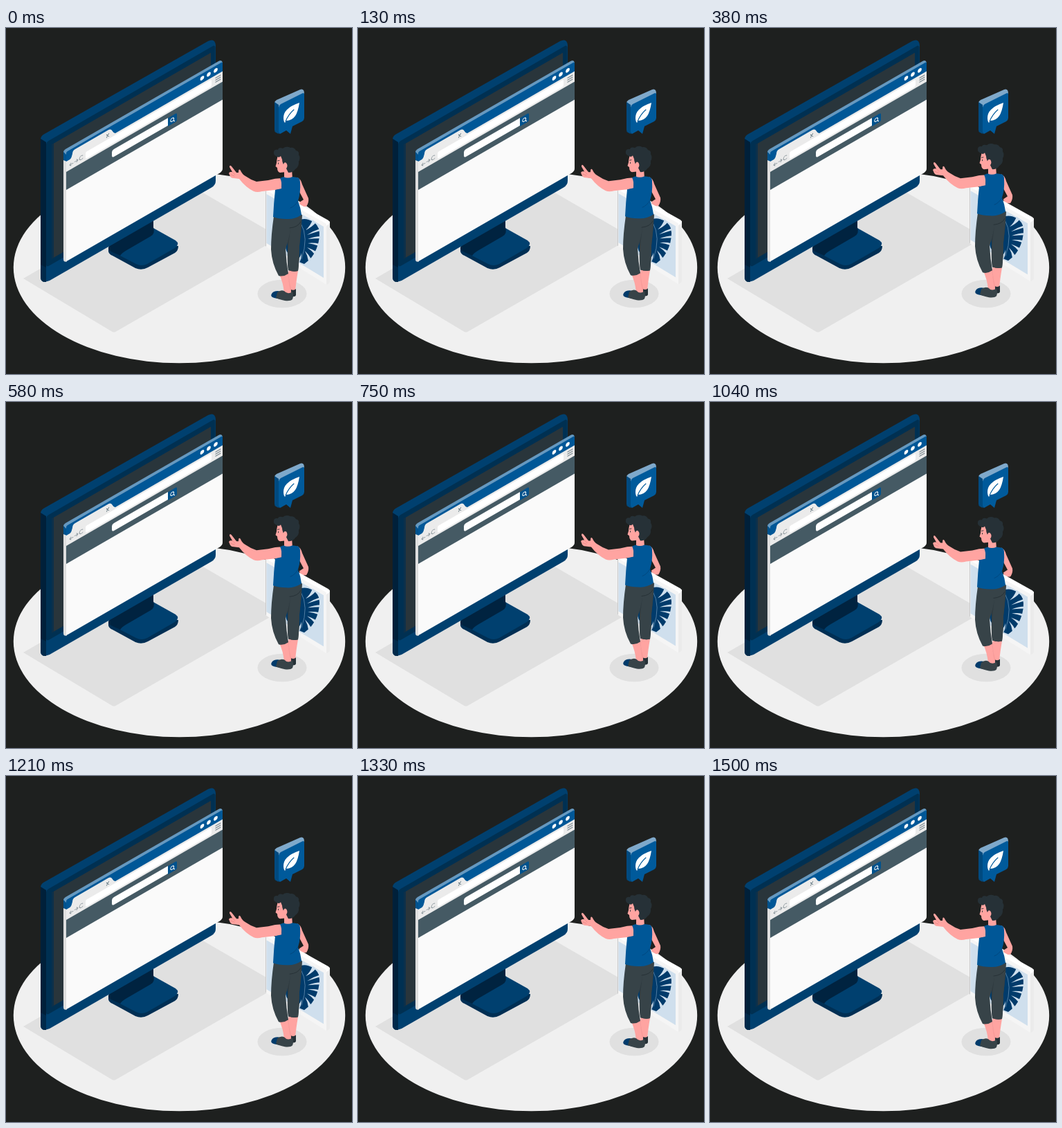
Recreate the animation shown at these times as an HTML page with a canvas. Size 500 by 500 pixels, loop 1540 ms.

```html
<!DOCTYPE html>
<html lang="en">
<head>
<meta charset="utf-8">
<title>Isometric browser scene</title>
<style>
html, body { margin: 0; width: 100%; height: 100%; overflow: hidden; background: #1e201f; }
canvas { display: block; width: 500px; height: 500px; }
</style>
</head>
<body>
<canvas id="stage" width="500" height="500"></canvas>
<script>
const ctx = document.getElementById('stage').getContext('2d');
const LOOP = 1540, STEPS = 37, LIFT = 8.5, SLOPE = -0.577;
const NAVY = '#00406f', BLUE = '#005797', SKIN = '#ffa4a1', PANTS = '#374348', HAIR = '#263137';
const GLASS = '#cfdfed', LEAF = '#003b6b';

function fill(color, path) {
  ctx.fillStyle = color;
  ctx.fill(new Path2D(path));
}

function line(color, width, path) {
  ctx.strokeStyle = color;
  ctx.lineWidth = width;
  ctx.lineCap = ctx.lineJoin = 'round';
  ctx.stroke(new Path2D(path));
}

function oval(color, x, y, rx, ry = rx) {
  ctx.fillStyle = color;
  ctx.beginPath();
  ctx.ellipse(x, y, rx, ry, 0, 0, Math.PI * 2);
  ctx.fill();
}

function box(color, x, y, w, h, radius = 0) {
  ctx.fillStyle = color;
  ctx.beginPath();
  ctx.roundRect(x, y, w, h, radius);
  ctx.fill();
}

// Draws in a plane whose horizontal axis climbs to the right.
function slanted(x, y, draw) {
  ctx.save();
  ctx.transform(1, SLOPE, 0, 1, x, y);
  draw();
  ctx.restore();
}

function drawFloor() {
  box('#1e201f', 0, 0, 500, 500);
  oval('#f0f0f0', 250.5, 346, 239.7, 138.3);
  fill('#e0e0e0', 'M25 362L262 225L396 302.5L160 438Q156 441 152 438Z');
}

function drawMonitor() {
  fill('#002f54', 'M148 317V323Q149 327 154 329L187 347Q196 351 205 346L244 325Q249 322 249 315Z');
  fill(NAVY, 'M152 320L211 288L245 307Q252 312 244 318L204 341Q196 345 188 341L161 327Z');
  fill('#002340', 'M148 317Q149 314 154 312L178 298L213 277V288Q216 297 209 301L178 319Q167 325 165 329L152 323Q148 321 148 317Z');

  fill(NAVY, 'M50 161Q50 157 54 154L292 19Q302 14 303 25V221Q303 227 297 230.5L63 365Q50 370 50 360Z');
  fill('#002a4b', 'M50 340L58 345V367Q50 368 50 360Z');
  fill('#00203a', 'M50 160L58 165V346L50 342Z');
  slanted(58, 165, () => {
    box('#003052', 0, 0, 244.5, 181, 4);
    box('#29353b', 8, 8, 230, 165);
    box('#0c304b', 8, 8, 3, 165);
  });
}

function drawBrowser() {
  fill('#dedede', 'M83 181L88 183V337.5Q83 339 83 334Z');
  fill('#00528d', 'M83 178L88 180V193L83 191Z');
  fill('#6699c0', 'M83 179Q83 177 86 175L308 47.5Q312 46 313 50V53L87 183Z');
  slanted(87, 182, () => {
    box('#fafafa', 0, 0, 226, 155.5, [0, 2, 4, 2]);
    box(BLUE, 0, -2.8, 226, 15, [2, 2, 0, 0]);
    box('#ebebeb', 0, 11, 226, 15);
    fill('#ebebeb', 'M5 12Q8 10 9 5Q9 0.5 13 0.5H61Q65 0.5 67 6Q69 11 73 12Z');
    box('#ffffff', 28, 13.5, 182, 10, 2);
    box('#455a64', 0, 26, 226, 26);
    box('#ffffff', 66, 32.7, 81, 11, [3, 0, 0, 3]);
    box('#00528d', 147, 33, 13, 12, [0, 2, 2, 0]);
    for (const u of [196.5, 206, 216]) oval('#ffffff', u, 3.8, 2.9);
    for (const v of [14.8, 17.8, 20.8]) line('#77858c', 1.2, `M216 ${v}h7`);
    line('#8b969c', 0.9, 'M5 19h5M7 17L5 19L7 21M12 18.5h5M15 16.5L17 18.5L15 20.5M24 16A2.8 2.8 0 1 0 24 20');
    line('#546b76', 0.9, 'M58.3 6l3.4 4M61.7 6l-3.4 4');
    line('#ffffff', 1, 'M155.6 39a2.4 2.4 0 1 0-4.8 0a2.4 2.4 0 1 0 4.8 0M155 41l1.6 2');
  });
}

function drawBubble() {
  fill('#7fa9cb', 'M388 108Q388 106 391 104L425 89Q431 87 431 95L394 115Z');
  fill('#004a80', 'M388 107L394 111V153L390 151Q388 150 388 147Z');
  fill('#005a9b', 'M394 115Q394 112 397 110L428 94.5Q431 93 431 96V130Q431 133 428 135L414 142L411 153L405 148L397 152.5Q394 154 394 150Z');
  fill('#ffffff', 'M424 108Q412 112 406 118Q401 123 401 130Q401 135 403 137L405 134Q413 134 418 127Q422 121 424 108Z');
  line('#005a9b', 1.1, 'M404 135Q408 125 416 118');
}

function drawLeaf() {
  fill(LEAF, 'M420 281Q427 274 437 277Q448 280 452 290Q455 302 449 318Q444 332 431 341Q419 337 408 326Q402 320 405 308Z');
  fill(GLASS, 'M433 292Q440 286 443 277L448 281Q442 288 433 292Z');
  fill(GLASS, 'M435 299Q444 293 454 290V293Q444 296 435 299Z');
  fill(GLASS, 'M436 305Q446 301 455 301V304Q446 304 436 305Z');
  fill(GLASS, 'M436 311Q445 310 453 312L452 315Q444 312 436 311Z');
  fill(GLASS, 'M435 317Q443 320 448 323L446 327Q441 321 435 317Z');
  fill(GLASS, 'M432 322Q438 328 441 334L437 337Q436 329 432 322Z');
  fill(GLASS, 'M427 325Q427 333 424 339L420 336Q426 331 427 325Z');
  line('#7498b9', 0.7, 'M426 282Q438 303 427 334');
}

function drawPicture() {
  fill('#ebebeb', 'M463 284L468 279V366Q468 369 463 371Z');
  fill('#ffffff', 'M375 235L380 230L466 278Q468 280 468 282L463 286Z');
  fill('#f5f5f5', 'M375 234L463 283V371L377 317Q375 316 375 314Z');
  fill('#c9c9c9', 'M375 235L376 236V316L375 315Z');
  fill(GLASS, 'M376.5 240L459 287V361L376.5 311Z');
  drawLeaf();
}

function drawLegs() {
  fill(SKIN, 'M394 354L408 352Q408 368 413 382L406 388L402 384Q401 368 394 354Z');
  fill(SKIN, 'M409 349L422 351Q419 368 418 381L412 383Q409 370 408 355Z');
  line('#f28f8f', 0.7, 'M408 355Q409 370 412 380');
  fill(LEAF, 'M384 384Q386 380 393 380L402 382L401 392Q389 391 385 389Q382 387 384 384Z');
  fill(HAIR, 'M412 378Q416 380 419 377V386Q418 389 412 388Z');
  fill(PANTS, 'M392 382Q397 378 402 380Q407 386 414 381Q416 387 414 392Q411 395 403 394Q394 392 390 390Z');

  fill('#303b40', 'M402 276L428 270Q427 293 424 315Q424 335 422 351Q416 353 408 350Q406 335 407 315Z');
  fill(PANTS, 'M387 272L427 269Q428 278 425 285Q418 290 411 291Q408 308 404 319Q405 338 408 355Q401 360 394 358Q384 340 383 320Q383 299 387 272Z');
  fill(PANTS, 'M411 290Q421 288 427 278Q426 300 424 315Q424 335 422 351Q415 353 408 350Q406 337 408 316Z');
  line('#273237', 1, 'M426 280Q422 288 410 289');
}

function drawTorso() {
  fill(SKIN, 'M402 203L413 204L414 218Q407 222 402 217Z');
  fill(SKIN, 'M399 217Q389 217 379 220L362 222Q353 219 346 214Q341 211 339 206Q336 202 336 209L333 209L326 200Q323 197 323 201L327 208L324 208Q321 209 323 212Q324 217 329 217L337 218Q346 230 358 236Q363 238 370 236L398 233Z');
  line('#e98583', 0.8, 'M327 208L331 212M325 212L330 214');
  fill(BLUE, 'M401 215Q407 218 414 215L421 216Q425 217 425 223Q426 238 422 250Q426 260 427 270Q417 277 405 276Q394 276 386 273Q387 252 389 234L398 232Q399 222 396 217Z');
  line('#00457a', 0.8, 'M422 250Q417 258 411 260');
}

function drawHead() {
  fill(SKIN, 'M393 184Q391 191 391 195L389.5 200Q391 201 392 202Q392 208 396 209L405 208L412 201V184Z');
  fill(HAIR, 'M392 186Q386 184 387 179Q388 175 393 176Q394 172 400 174Q405 170 411 173Q416 172 419 177Q424 178 423 183Q426 188 423 193Q424 200 418 204Q415 209 408 209L405 203Q399 196 399 190L397 185Q395 188 392 186Z');
  fill(SKIN, 'M401 197Q402 193 405 195Q408 199 405 203Q401 205 400 201Z');
  line(HAIR, 0.9, 'M392.5 192L395 191.5M393.5 195V196.5');
}

function drawPerson(dy) {
  oval('#e0e0e0', 399, 384, 35.5, 20.3);
  ctx.save();
  ctx.translate(0, dy);
  fill(SKIN, 'M421 216Q426 218 428 226L437 246Q438 252 434 258L425 258L424 252L430 248L422 233Z');
  drawPicture();
  drawLegs();
  drawTorso();
  drawHead();
  ctx.restore();
}

function bob(time) {
  const step = Math.floor((time + 3) / LOOP * STEPS) * LOOP / STEPS;
  return -LIFT * (1 - Math.cos(2 * Math.PI * (step + 35) / LOOP)) / 2;
}

const start = performance.now();

function render() {
  const time = Math.max(0, performance.now() - start) % LOOP;
  drawFloor();
  drawMonitor();
  drawBrowser();
  drawBubble();
  drawPerson(bob(time));
  requestAnimationFrame(render);
}

render();
</script>
</body>
</html>
```
